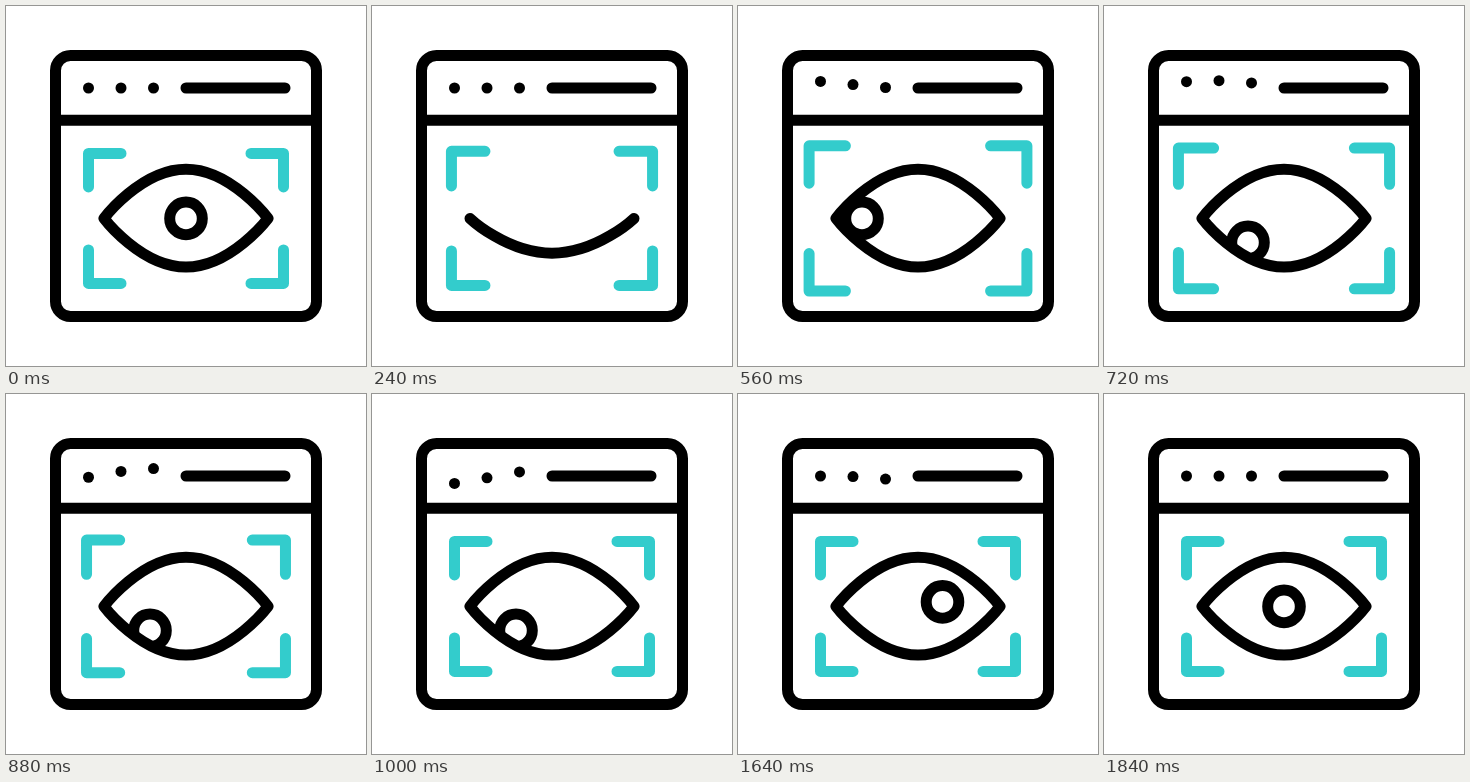
Recreate the animation shown at these times as an HTML page. Size 360 by 360 pixels, loop 1880 ms.

```html
<!DOCTYPE html>
<html lang="en">
<head>
<meta charset="utf-8">
<title>Browser eye scan</title>
<style>
  html, body { margin: 0; height: 100%; overflow: hidden; background: #fff; }
  svg { display: block; width: 100vw; height: 100vh; }
  .line { fill: none; stroke: #000; stroke-width: 11; stroke-linecap: round; stroke-linejoin: round; }
  #brackets { stroke: #33cccc; vector-effect: non-scaling-stroke; }
</style>
</head>
<body>
<svg viewBox="0 0 360 360">
  <clipPath id="inside"><path class="lens"/></clipPath>
  <g class="line">
    <rect x="49.5" y="49.5" width="261" height="261" rx="15"/>
    <path d="M50 114.3H310M180 82H279"/>
  </g>
  <g id="dots">
    <circle cx="82.5" r="5.5"/>
    <circle cx="115" r="5.5"/>
    <circle cx="147.5" r="5.5"/>
  </g>
  <path id="brackets" class="line" d="M-65 -65H-97.5V-31.5M65 -65H97.5V-31.5M-97.5 31.5V65H-65M97.5 31.5V65H65"/>
  <g clip-path="url(#inside)"><circle id="pupil" class="line" r="16.3"/></g>
  <path class="lens line"/>
</svg>
<script>
const LOOP = 1880, STEP = 40;
const CX = 180, CY = 212.4;
const BLINK = 160, GLANCE = 160;
const $ = s => document.querySelector(s);
const dots = [...$('#dots').children], lenses = document.querySelectorAll('.lens');

// Eased 0 to 1 between two times
function ramp(t, from, to) {
  const p = Math.min(1, Math.max(0, (t - from) / (to - from)));
  return (1 - Math.cos(Math.PI * p)) / 2;
}
// Out between a and b, back between b and c
const pulse = (t, a, b, c) => ramp(t, a, b) - ramp(t, b, c);

// Up, then down past the rest line, then home
const bounce = t => -7.5 * pulse(t, 280, 640, 1120) + 10 * pulse(t, 640, 1120, 1600);

const glances = [
  { at: 400, dx: -56, dy: 0 },
  { at: 560, dx: 20, dy: 24 },
  { at: 1120, dx: 85, dy: -33 },
  { at: 1560, dx: -49, dy: 9 },
];

const lid = (y, dir) =>
  `C${CX - dir * 82} ${CY} ${CX - dir * 45} ${y} ${CX} ${y}S${CX + dir * 82} ${CY} ${CX + dir * 82} ${CY}`;
const lens = (top, bottom) => `M${CX - 82} ${CY}${lid(top, 1)}${lid(bottom, -1)}Z`;

function draw(now) {
  const t = Math.floor(now % LOOP / STEP) * STEP;

  const shut = pulse(t, 240 - BLINK, 240, 240 + BLINK);
  const path = lens(163.2 + 84 * shut, 261 - 13.8 * shut);
  lenses.forEach(el => el.setAttribute('d', path));

  const scale = 1 + 0.117 * pulse(t, 70, 560, 1000);
  $('#brackets').setAttribute('transform', `translate(${CX} ${CY}) scale(${scale})`);

  let x = CX, y = CY;
  for (const { at, dx, dy } of glances) {
    const moved = ramp(t, at, at + GLANCE);
    x += dx * moved;
    y += dy * moved;
  }
  $('#pupil').setAttribute('transform', `translate(${x} ${y})`);

  dots.forEach((dot, i) => dot.setAttribute('cy', 82 + bounce(t - 110 * i)));
}

const start = performance.now();
function tick() {
  draw(performance.now() - start);
  requestAnimationFrame(tick);
}
tick();
</script>
</body>
</html>
```
